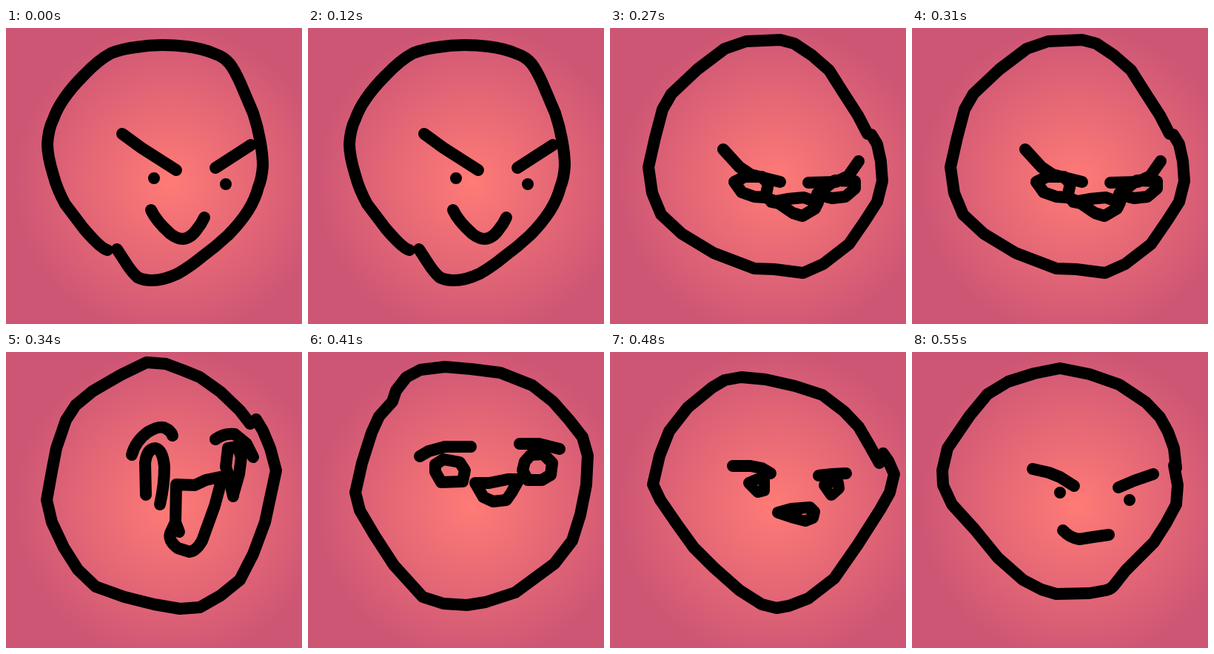
Recreate the animation shown at these times as an HTML page. Size 400 by 400 pixels, loop 620 ms.

```html
<!DOCTYPE html>
<html lang="en">
<head>
<meta charset="utf-8">
<title>Scribbled faces</title>
<style>
  html, body { margin: 0; width: 100%; height: 100%; overflow: hidden; }
  body { background: radial-gradient(circle at 222px 208px, #ff7b76, #cd5675 212px); }
  svg { display: block; width: 400px; height: 400px; }
  path { fill: none; stroke: #000; stroke-width: 16; stroke-linecap: round; stroke-linejoin: round; }
  .solid { fill: #000; }
  .glint { stroke: #f77374; stroke-width: 1.6; }

  /* Each face is a pose held for its share of the 620 ms loop. */
  g { visibility: hidden; animation: brief 620ms step-end infinite; animation-delay: calc(var(--at) * 1ms - 620ms); }
  .hold { animation-name: long; }
  @keyframes brief { 0% { visibility: visible; } 11.29032%, 100% { visibility: hidden; } }
  @keyframes long { 0% { visibility: visible; } 32.25806%, 100% { visibility: hidden; } }
</style>
</head>
<body>
<svg viewBox="0 0 400 400">
  <!-- sly grin -->
  <g class="hold" style="--at:0">
    <path d="M137 300Q128 298 105 271L80 238Q69 218 64 199Q56 173 56 157Q57 137 64 123Q69 109 78 96Q88 81 105 64Q125 43 142 34Q158 28 175 26Q193 23 211 23Q228 23 244 25Q266 28 280 34Q295 39 302 48Q309 57 317 75L334 115Q340 133 343 150Q347 171 347 186Q346 203 341 215Q337 231 327 247Q316 264 300 280Q283 296 265 309Q248 323 232 332Q213 341 197 341Q186 341 178 337Q172 332 165 322L150 299"/>
    <path d="M157 143L183 162L230 192M283 189L331 158M200 203h.01M297 211h.01"/>
    <path d="M196 246Q203 261 222 278Q231 285 239 285Q250 284 258 272Q264 265 268 256"/>
  </g>

  <!-- snarl -->
  <g style="--at:200">
    <path d="M348 204L348 186L346 170L341 147L326 110L301 64L292 53L249 26L225 20L200 18L165 21L133 36L97 64L79 86L70 105L59 150L57 187L67 229L83 260L105 294L128 324L153 347Q165 355 175 357L204 360L243 351L270 335L300 313L323 284L343 249L361 214"/>
    <path d="M160 156L185 181L205 195L215 200L233 201M327 170L305 188L290 195L275 198"/>
    <path d="M187 206Q186 198 197 197Q208 197 208 205Q206 214 196 214Q188 213 187 206Z"/>
    <path d="M289 210L293 199L304 198L314 203L315 212L308 221L297 222Z"/>
    <path d="M208 247L222 247L244 254L260 252L271 251L264 262L255 273L239 279L225 280Q212 277 207 260Z"/>
  </g>

  <!-- squint -->
  <g style="--at:270">
    <path d="M348 143L335 118L315 87L296 57L273 37L249 21L230 16L184 18L155 28L118 56L83 89L71 110L61 148L52 188L57 223L69 252L97 278L140 304L195 325L222 326L261 331L288 319L323 292L345 260L361 235L368 207L366 180L361 157L353 144"/>
    <path d="M153 164L175 188L190 198L230 208M336 180L322 200L305 208L268 209"/>
    <path d="M168 208L182 201L205 201L214 210L210 229L195 228L178 222ZM210 229L228 236"/>
    <path d="M280 224L304 206L331 207L331 217L318 228L300 230L284 226Z"/>
    <path d="M218 235L240 231L262 229L281 236L277 244L260 254L247 250L228 237Z"/>
  </g>

  <!-- big laugh -->
  <g style="--at:340">
    <path d="M330 97L316 79L290 54L262 34L240 25L216 16L190 14L155 31L117 53L94 72L81 92L68 130L62 161L55 200L62 230L78 264L97 294L121 317L160 331L200 341L235 347L262 345L290 329L316 308L334 273L350 230L365 160L357 130L347 106L338 91"/>
    <path d="M170 139Q175 120 192 108Q206 100 213 102Q223 106 225 113M283 118Q295 109 309 111L325 124L334 142"/>
    <path d="M189 193L188 150Q190 131 202 130Q212 132 214 155Q214 180 208 206"/>
    <path d="M307 195L302 172L297 155L300 130L313 128L318 142L315 165L307 193"/>
    <path d="M234 243L229 230L230 179L255 180L270 173L289 169L290 178L282 208L265 255Q257 269 248 270L232 265Q219 255 222 245L229 230"/>
  </g>

  <!-- surprise -->
  <g style="--at:410">
    <path d="M114 67L119 52L133 34L152 24L185 20L220 23L260 28L303 45L331 67L353 92L371 115L378 140L376 180L368 220L357 255L333 286L280 325L240 338L215 342L183 340L155 331L116 288L90 248L70 214L64 190L73 150L86 109L96 87L114 67"/>
    <path d="M151 141L163 134L185 128L220 128M286 124L312 124L340 131"/>
    <path d="M172 152L183 145L205 149L212 160L209 175L180 176L172 162Z"/>
    <path d="M301 139L318 138L330 150L328 166L316 173L297 173L290 160L293 148Z"/>
    <path d="M226 177L245 177L270 172L285 172L275 190L268 200L250 202L237 196Z"/>
  </g>

  <!-- scowl -->
  <g style="--at:480">
    <path d="M364 150L350 125L336 101L316 80L287 58L250 46L210 37L177 34L155 38L138 48L105 75L80 107L67 140L58 179L68 200L90 232L113 264L140 291L175 322L205 341L225 346L242 343L268 333L303 306L335 260L365 213L378 190L384 165L376 147L369 137L364 150"/>
    <path d="M166 154L190 154L205 157L217 164M282 167L300 165L319 164"/>
    <path class="solid" d="M188 177L200 172L208 172L208 187L200 189Z"/>
    <path class="solid" d="M290 180L299 193L309 184L308 177Z"/>
    <path class="solid" d="M227 217L245 212L270 210L276 216L274 224L264 228L245 223Z"/>
    <path class="glint" d="M200 180h.01M301 184h.01M260 219.500L265 219"/>
  </g>

  <!-- smirk -->
  <g style="--at:550">
    <path d="M357 157L354 130L346 108L335 88L316 68L280 44L240 30L200 22L165 29L130 40L102 57L78 86L48 130L41 160L42 180L54 206L85 240L116 278L150 308L175 321L195 327L240 326L262 322Q270 320 274 314L289 295L327 257L343 232L357 206L359 180L354 153"/>
    <path d="M163 158L185 163L200 169L219 181M279 183L300 174L326 165M200 190h.01M294 200h.01"/>
    <path d="M204 241Q213 251 226 253L245 250L266 247"/>
  </g>
</svg>
</body>
</html>
```
